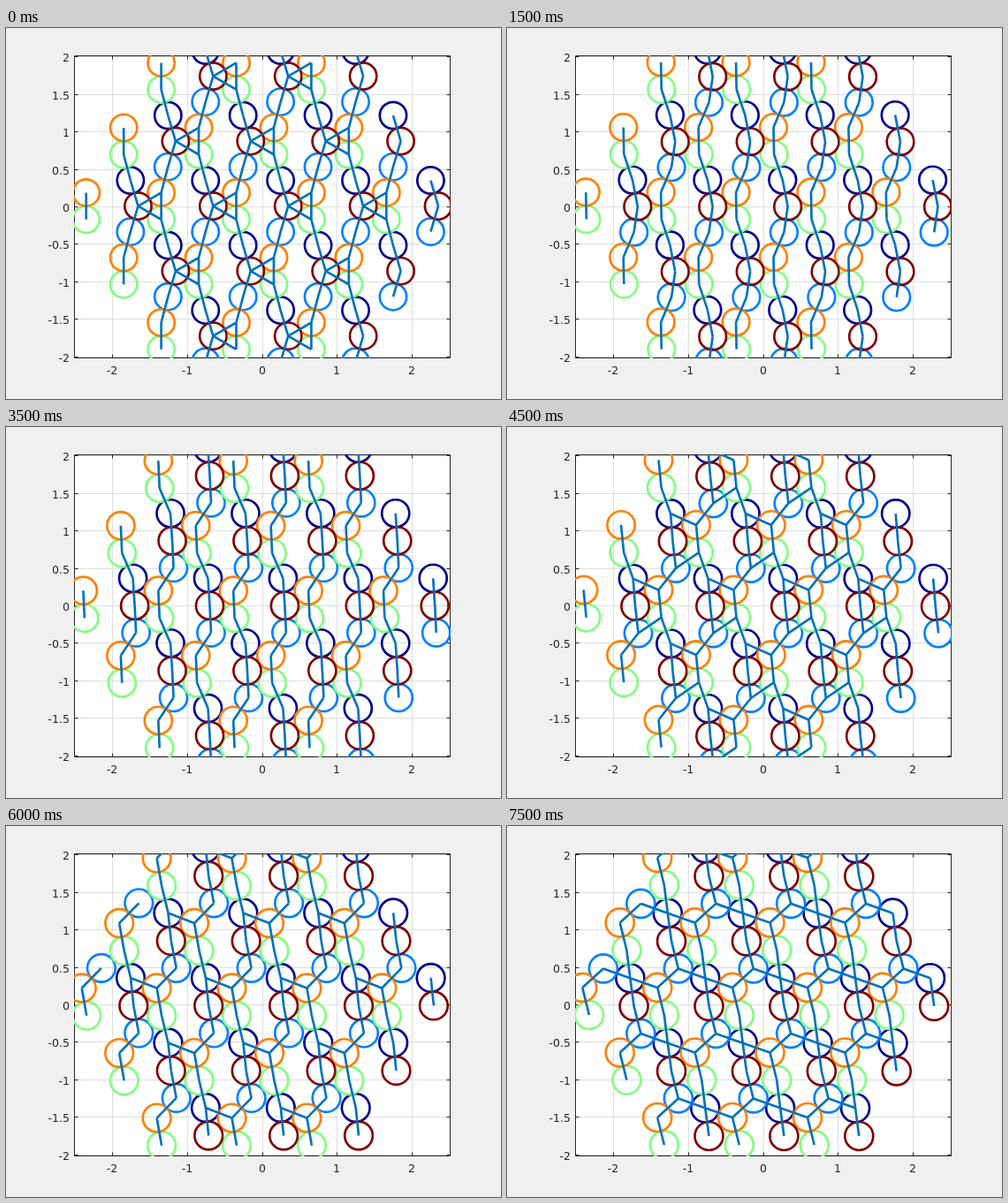
An HTML page with a canvas that plays this animation: 560 px wide and 420 px high, repeating every 8000 ms.

```html
<!DOCTYPE html>
<html lang="en">
<head>
<meta charset="utf-8">
<title>Periodic disk packing</title>
<style>
html, body { margin: 0; width: 100%; height: 100%; overflow: hidden; background: #f0f0f0; }
canvas { display: block; }
</style>
</head>
<body>
<canvas id="stage" width="560" height="420"></canvas>
<script>
const ctx = document.getElementById('stage').getContext('2d');
const STEP = 500, STEPS = 16, WRAP_STEP = 12;
const UNIT = 84.9, ROW = UNIT * Math.sqrt(3) / 2;
const CX = 290, CY = 202.46, CENTROID = [292.3, 201.6];
const BOX = { x: 77.5, y: 31.5, w: 425, h: 342 };
const right = BOX.x + BOX.w, bottom = BOX.y + BOX.h;

// Listed in drawing order.
const colors = { navy: '#00008f', blue: '#0080ff', green: '#80ff80', orange: '#ff8000', red: '#800000' };

// Touching disks form a chain that starts at red. Each link has a direction
// in degrees from upright at the key steps, and a jump to another cell.
const keySteps = [0, 7, 11, 15];
const chain = [
  { from: 'red', to: 'navy', angles: [-16.5, -3.7, -5.4, -7.6], jump: [0, 0] },
  { from: 'navy', to: 'green', angles: [-14.7, -23.4, -15.6, -7.1], jump: [0, 1] },
  { from: 'green', to: 'orange', angles: [0, -2.6, -8.7, -13.9], jump: [0, 0] },
  { from: 'orange', to: 'blue', angles: [14.7, 33.7, 43.2, 47.7], jump: [-1, 1] }
];

// Other contacts; some hold only from step "first" to "last".
const contacts = [
  { from: 'blue', to: 'red', jump: [0, 0] },
  { from: 'red', to: 'orange', jump: [1, 0], last: 1 },
  { from: 'red', to: 'green', jump: [1, 0], last: 1 },
  { from: 'navy', to: 'orange', jump: [1, 0], first: 8 },
  { from: 'blue', to: 'green', jump: [1, 0], first: 8, last: 11 },
  { from: 'navy', to: 'blue', jump: [-1, 1], first: 14 }
];

const cells = [];
for (let b = -3; b <= 3; b++) for (let a = -3; a <= 3; a++) cells.push([a, b]);

const offset = (a, b) => [(a + b / 2) * UNIT, -b * ROW];
const diameter = step => 30.3 + 0.113 * step;

function atStep(values, step) {
  let i = 0;
  while (i < keySteps.length - 2 && step > keySteps[i + 1]) i++;
  const u = (step - keySteps[i]) / (keySteps[i + 1] - keySteps[i]);
  return values[i] + (values[i + 1] - values[i]) * u;
}

// Follow the chain, then move its centroid to the fixed point.
function solve(step) {
  const d = diameter(step), pos = { red: [0, 0] };
  for (const { from, to, angles, jump } of chain) {
    const angle = atStep(angles, step) * Math.PI / 180;
    const [ox, oy] = offset(...jump), [x, y] = pos[from];
    pos[to] = [x + d * Math.sin(angle) - ox, y - d * Math.cos(angle) - oy];
  }
  const all = Object.values(pos);
  const shift = [0, 1].map(k => CENTROID[k] - all.reduce((sum, p) => sum + p[k], 0) / all.length);
  for (const p of all) { p[0] += shift[0]; p[1] += shift[1]; }
  return pos;
}

// The patch is a hexagon of cells; blue wraps around to another cell.
function exists(name, a, b, step) {
  if (name === 'blue' && step >= WRAP_STEP) { a += 1; b -= 1; }
  return Math.max(Math.abs(a), Math.abs(b), Math.abs(a + b)) <= 2;
}

function line(x1, y1, x2, y2) {
  ctx.moveTo(x1, y1);
  ctx.lineTo(x2, y2);
}

const snap = v => Math.floor(v) + 0.5;
const tickX = i => snap(CX + i * UNIT);
const tickY = i => snap(CY - i * UNIT / 2);

function drawGrid() {
  ctx.fillStyle = '#f0f0f0';
  ctx.fillRect(0, 0, 560, 420);
  ctx.fillStyle = '#fff';
  ctx.fillRect(BOX.x, BOX.y, BOX.w, BOX.h);
  ctx.beginPath();
  for (let i = -2; i <= 2; i++) line(tickX(i), BOX.y, tickX(i), bottom);
  for (let i = -4; i <= 4; i++) line(BOX.x, tickY(i), right, tickY(i));
  ctx.lineWidth = 1;
  ctx.strokeStyle = '#dedede';
  ctx.stroke();
}

function drawAxes() {
  ctx.strokeStyle = ctx.fillStyle = '#262626';
  ctx.font = '12.5px "DejaVu Sans", sans-serif';
  ctx.beginPath();
  ctx.rect(BOX.x, BOX.y, BOX.w, BOX.h);
  ctx.textAlign = 'center';
  for (let i = -2; i <= 2; i++) {
    const x = tickX(i);
    line(x, BOX.y, x, BOX.y + 4);
    line(x, bottom, x, bottom - 4);
    ctx.fillText(i, x - 0.5, 391.5);
  }
  ctx.textAlign = 'right';
  for (let i = -4; i <= 4; i++) {
    const y = tickY(i);
    line(BOX.x, y, BOX.x + 4, y);
    line(right, y, right - 4, y);
    ctx.fillText(i / 2, 72, y + 5.5);
  }
  ctx.stroke();
}

function drawPacking(step) {
  const pos = solve(step);
  const place = (name, a, b) => offset(a, b).map((v, k) => v + pos[name][k]);
  ctx.save();
  ctx.beginPath();
  ctx.rect(BOX.x - 0.5, BOX.y - 0.5, BOX.w + 1, BOX.h + 1);
  ctx.clip();
  ctx.lineWidth = 2.67;
  for (const name in colors) {
    ctx.strokeStyle = colors[name];
    for (const [a, b] of cells) {
      if (!exists(name, a, b, step)) continue;
      ctx.beginPath();
      ctx.arc(...place(name, a, b), diameter(step) / 2, 0, 2 * Math.PI);
      ctx.stroke();
    }
  }
  ctx.strokeStyle = '#0072bd';
  ctx.beginPath();
  for (const { from, to, jump, first = 0, last = STEPS } of [...chain, ...contacts]) {
    if (step < first || step > last) continue;
    for (const [a, b] of cells) {
      const end = [a + jump[0], b + jump[1]];
      if (exists(from, a, b, step) && exists(to, ...end, step))
        line(...place(from, a, b), ...place(to, ...end));
    }
  }
  ctx.stroke();
  ctx.restore();
}

function draw() {
  const step = Math.floor(performance.now() / STEP) % STEPS;
  drawGrid();
  drawAxes();
  drawPacking(step);
  requestAnimationFrame(draw);
}
draw();
</script>
</body>
</html>
```
